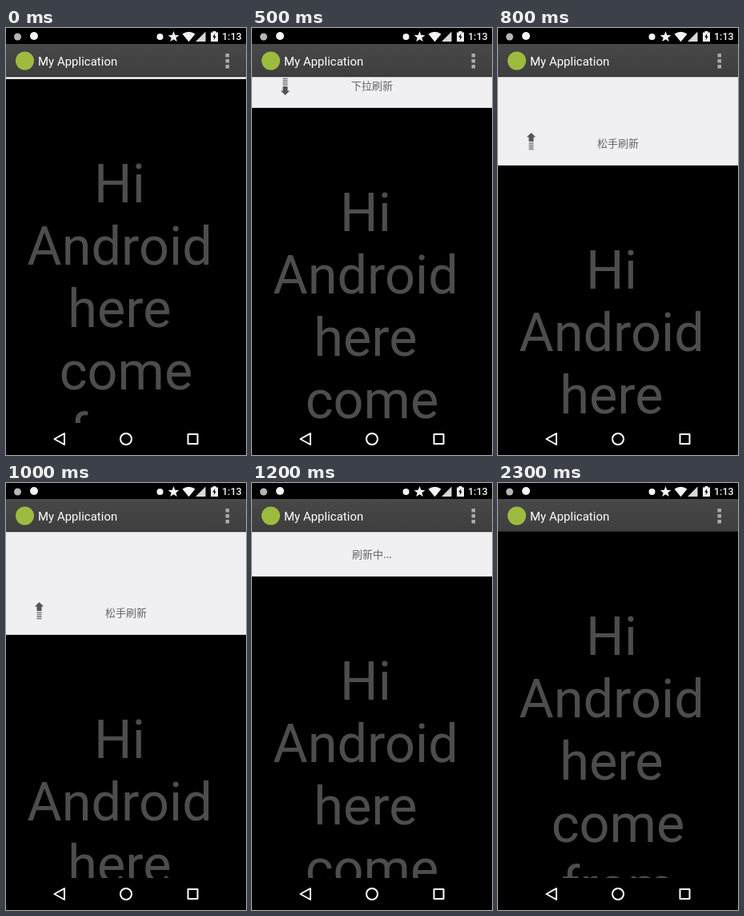
Recreate the animation shown at these times as an HTML page. Size 300x534 px, loop 2400 ms.

```html
<!DOCTYPE html>
<html lang="zh-CN">
<head>
<meta charset="utf-8">
<title>Pull to refresh</title>
<style>
  html, body { margin: 0; width: 100%; height: 100%; overflow: hidden; background: #000; }
  svg { display: block; width: 300px; height: 534px; font-family: Roboto, sans-serif; }

  .list, .label { animation: 2400ms step-end infinite; }
  .list { animation-name: pull; }
  .hint { animation-name: hint; }
  .release { animation-name: release; }
  .busy { animation-name: busy; }

  .big { font-size: 66.67px; fill: #4d4d4d; text-anchor: middle; }
  .label { font: 300 13px "Noto Sans CJK SC", "Noto Sans CJK", sans-serif; fill: #666; text-anchor: middle; }

  /* y is the bottom edge of the refresh header; one step per 100 ms */
  @keyframes pull {
    0% { transform: translateY(64px); }
    8.3333% { transform: translateY(65px); }
    16.6667% { transform: translateY(66px); }
    20.8333% { transform: translateY(100px); }
    25% { transform: translateY(142px); }
    29.1667% { transform: translateY(158px); }
    33.3333% { transform: translateY(172px); }
    37.5% { transform: translateY(183px); }
    41.6667% { transform: translateY(190px); }
    45.8333% { transform: translateY(145px); }
    50% { transform: translateY(117px); }
    91.6667% { transform: translateY(85px); }
    95.8333%, 100% { transform: translateY(61px); }
  }
  @keyframes hint {
    0% { opacity: 1; }
    29.1667%, 100% { opacity: 0; }
  }
  @keyframes release {
    0% { opacity: 0; }
    29.1667% { opacity: 1; }
    45.8333%, 100% { opacity: 0; }
  }
  @keyframes busy {
    0% { opacity: 0; }
    45.8333%, 100% { opacity: 1; }
  }
</style>
</head>
<body>
<svg viewBox="0 0 300 534">
  <defs>
    <linearGradient id="bar" x2="0" y2="1">
      <stop offset="0" stop-color="#484848"/>
      <stop offset="1" stop-color="#3e3e3e"/>
    </linearGradient>
    <g id="arrow" fill="#555">
      <path d="M-3 1.5H3V7H5.7L0 12.5L-5.7 7H-3Z"/>
      <path d="M-3 -8H3M-3 -5.5H3M-3 -3H3M-3 -.5H3" stroke="#777" stroke-width="1.4"/>
    </g>
  </defs>

  <rect width="300" height="534"/>

  <g class="list">
    <rect y="-200" width="300" height="200" fill="#f0f0f3"/>
    <rect y="-1" width="300" height="1" fill="#d4d4d6"/>
    <g class="label hint">
      <use href="#arrow" transform="translate(41.5 -28.5)"/>
      <text x="150" y="-23.2">下拉刷新</text>
    </g>
    <g class="label release">
      <use href="#arrow" transform="translate(41.5 -28.5) rotate(180)"/>
      <text x="150" y="-23.2">松手刷新</text>
    </g>
    <g class="label busy">
      <text x="150" y="-23.2">刷新中...</text>
    </g>
    <g class="big">
      <text x="142" y="154">Hi</text>
      <text x="142" y="232.1">Android</text>
      <text x="142" y="310.2">here</text>
      <text x="150" y="388.3">come</text>
      <text x="150" y="466.4">from</text>
    </g>
  </g>

  <!-- status bar -->
  <rect width="300" height="20"/>
  <g fill="#f4f4f4">
    <circle cx="14.5" cy="11" r="4.5" fill="#b5b5b5"/>
    <circle cx="35" cy="10" r="5"/>
    <circle cx="192.5" cy="11" r="4"/>
    <path d="M209.5 4L211.3 8.8L216.4 9L212.4 12.2L213.8 17.1L209.5 14.3L205.2 17.1L206.6 12.2L202.6 9L207.7 8.8Z"/>
    <path d="M220.5 7.5Q228.5 1.8 236.5 7.5L228.5 17.3Z"/>
    <path d="M249.5 4.5V17H237Z" fill="#d8d8d8"/>
    <path d="M256 5.5H258.5V4H262.5V5.5H265V17H256Z"/>
    <path d="M261.4 6.8L258.2 11.6H260.3L259.5 15.3L262.8 10.4H260.8Z" fill="#000"/>
    <text x="270" y="15.4" font-size="12.5" font-weight="500">1:13</text>
  </g>

  <!-- action bar -->
  <rect y="20" width="300" height="41" fill="url(#bar)"/>
  <rect y="60" width="300" height="1" fill="#2c2c2c"/>
  <rect y="61" width="300" height="1" fill="#000" opacity=".2"/>
  <circle cx="23.5" cy="41" r="11.5" fill="#9dbb3f"/>
  <text x="40" y="47" font-size="15" fill="#fff">My Application</text>
  <path d="M274.5 32h4.5v4.5h-4.5zM274.5 39h4.5v4.5h-4.5zM274.5 46h4.5v4.5h-4.5z" fill="#ababab"/>

  <!-- navigation bar -->
  <rect y="494" width="300" height="40"/>
  <g fill="none" stroke="#fff" stroke-width="2" stroke-linejoin="round">
    <path d="M60.5 514L73 507V521Z"/>
    <circle cx="150" cy="514" r="7"/>
    <rect x="227.5" y="508" width="12" height="12"/>
  </g>
</svg>
</body>
</html>
```
